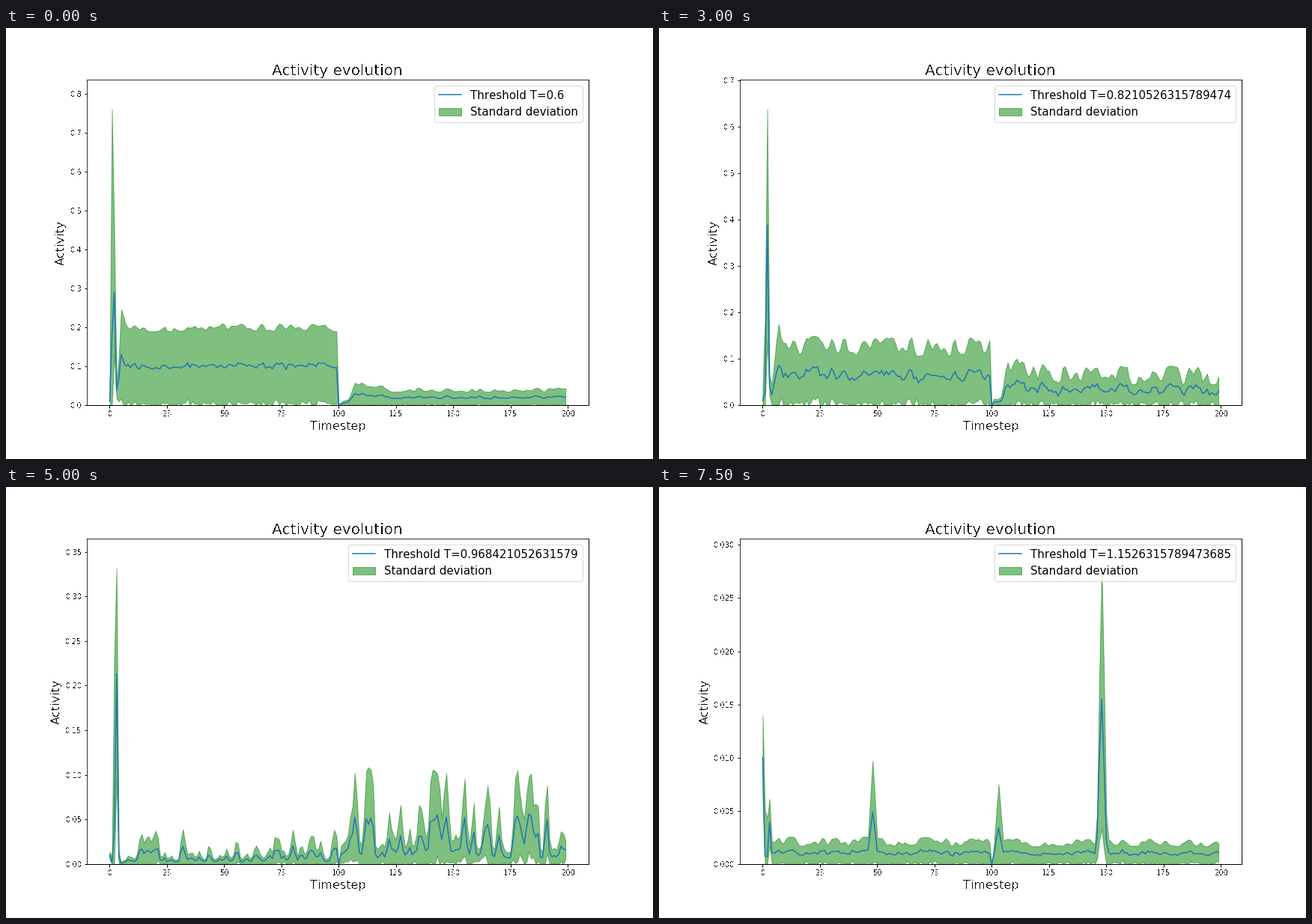
Animation of 864 by 576 pixels, one loop 8000 ms. Source, as a matplotlib script:

```python
import numpy as np
import matplotlib.pyplot as plt
from matplotlib.animation import FuncAnimation

plt.rcParams["text.kerning_factor"] = 6

STEPS, RESET = 200, 100
FRAMES = 16
THRESHOLDS = np.linspace(0.6, 1.3, 20)
t = np.arange(STEPS)

# Key points along the threshold index; activity in thousandths
KEYS = [0, 4, 6, 8, 10, 12, 15]
TOP = [759.6, 544, 638, 601, 331.5, 255.8, 27.8]
BURST_TIME = [1.35, 1.75, 1.85, 1.95, 2.6, 2.6, 2.6]
LEVEL = [200, 162, 126, 82, 15, 14, 2.1], [39, 47, 62, 82, 38, 24, 2]
SPREAD = [.035, .06, .11, .25, .7, .7, .13], [.1, .13, .2, .32, .7, .9, .12]

# Rare bursts of the quiet regime: step and share of the top
SPIKES = (48, .35), (103, .27), (148, 1)


def at(values, i):
    return np.interp(i, KEYS, values)


def by_half(pair, i):
    """One value before the reset, another after it."""
    return np.where(t < RESET, at(pair[0], i), at(pair[1], i))


def ripple(rng):
    """Smooth bounded noise of about unit size."""
    kernel = np.array([.6, 1, .6])
    noise = np.convolve(rng.standard_normal(STEPS), kernel, "same")
    return 1.6 * np.tanh(noise / np.linalg.norm(kernel) / 1.2)


def bump(center, width):
    return np.exp(-((t - center) / width) ** 2)


def recovery(i, center):
    """Dip and overshoot after the opening burst and after the reset."""
    peak = center + 3.5 + i / 3.5
    start = np.interp(t, [center + 2.2, peak, peak + 2], [.3, 1.3, 1])
    again = np.interp(t - RESET, [0, 1, 4, 7, 16, 24],
                      [0, .2, .35, 1.4, 1.3, 1])
    return np.where(t < RESET, start, again)


def activity(i):
    """Mean and standard deviation of the activity for threshold i."""
    rng = np.random.default_rng(i + 7)
    top = np.exp(at(np.log(TOP), i))
    center = at(BURST_TIME, i)
    spread = by_half(SPREAD, i)
    quiet = i > 13

    upper = by_half(LEVEL, i) * np.exp(spread * ripple(rng))
    if not quiet:
        upper *= recovery(i, center)
    burst = bump(center, .75)
    height = .22 * top if quiet else top
    upper = np.maximum(upper, height * burst / burst.max())
    upper = np.maximum(upper, 14 * np.exp(-t))
    if quiet:
        for step, share in SPIKES:
            upper = np.maximum(upper, share * top * bump(step, 1.5))

    jitter = np.minimum(.04, .01 + .15 * spread)
    ratio = .51 + jitter * rng.standard_normal(STEPS)
    rise = .15 + .5 / (1 + np.exp(8 * (center - .15 - t[:4])))
    ratio[:4] = rise
    mean = upper * ratio
    mean[0] = 10
    mean[RESET] = upper[RESET] = 0
    return mean / 1000, (upper - mean) / 1000


def crisp(im, dpi):
    """Hard-edged thin black text without soft pixels."""
    im = im.copy()
    im[..., :3] = 0
    im[..., 3] = im[..., 3] >= .7
    return im, 0, 0


fig = plt.figure(figsize=(12, 8), dpi=72, facecolor="white")
ax = fig.add_subplot()
fig.subplots_adjust(left=.125, right=.9, bottom=.125, top=.88)
for side in ("right", "bottom"):
    ax.spines[side].set_linewidth(1)


def draw(i):
    ax.clear()
    mean, std = activity(i)
    upper = mean + std
    ax.plot(t, mean, label=f"Threshold T={THRESHOLDS[i]}")
    ax.fill_between(t, np.maximum(mean - std, 0), upper, color="green",
                    alpha=.5, label="Standard deviation")
    ax.set_ylim(0, 1.1 * upper.max())
    ax.tick_params(width=1)
    texts = [ax.set_title("Activity evolution", fontsize=20),
             ax.set_xlabel("Timestep", fontsize=16),
             ax.set_ylabel("Activity", fontsize=16)]
    for text in texts + ax.get_xticklabels() + ax.get_yticklabels():
        text.set_agg_filter(crisp)
    ax.legend(loc="upper right", fontsize=15)
    return []


anim = FuncAnimation(fig, draw, frames=FRAMES, interval=500, repeat=True,
                     init_func=lambda: [])
plt.show()
```
